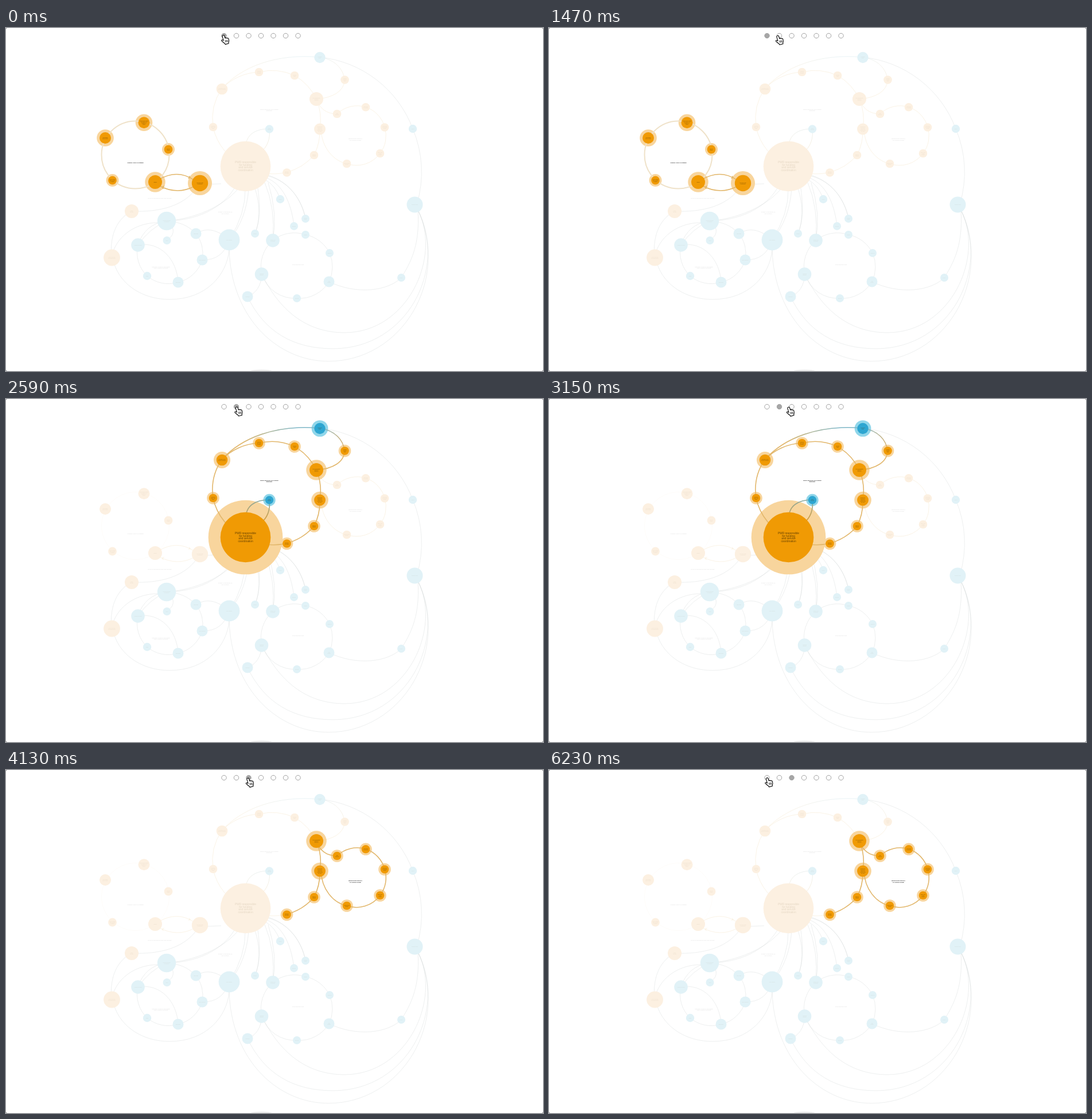
Write an HTML page that moves like this. It is 936 px wide and 599 px high and loops after 6300 ms.

```html
<!DOCTYPE html>
<html lang="en">
<head>
<meta charset="utf-8">
<title>System map</title>
<style>
html, body { margin: 0; width: 100%; height: 100%; overflow: hidden; background: #555 }
svg { display: block; font-family: "Liberation Sans", Arial, sans-serif; text-anchor: middle }
.halo { display: none }
.halo.on { display: inline }
.orange .halo { fill: #f8d59d }
.blue .halo { fill: #90d6ea }
.orange .core { fill: #fcf0e1 }
.blue .core { fill: #e1f2f7 }
.orange .core.on { fill: #f09a04 }
.blue .core.on { fill: #2ea6d1 }
.edge { fill: none; stroke: #e2b76c; stroke-width: 1; opacity: .17 }
.edge.on { stroke-width: 1.6; opacity: 1 }
.ring { opacity: .04 }
.ring.on { stroke: #efe2c9; stroke-width: 2 }
.base { stroke: #cdd3d3; opacity: .36 }
.tag { font-size: 1.8px; fill: #4a3000; opacity: .13 }
.tag.on { opacity: .85 }
.title { font-size: 2.5px; font-weight: bold; fill: #000; opacity: .13 }
.title.on { opacity: 1 }
.big { font-size: 4.8px }
.dot { fill: #fff; stroke: #a2a2a2 }
.dot.on { fill: #a6a6a6 }
</style>
</head>
<body>
<svg id="stage" width="936" height="599" viewBox="0 0 936 599">
  <defs>
    <linearGradient id="toBlue" gradientUnits="userSpaceOnUse" x1="376" y1="0" x2="547" y2="0">
      <stop offset=".2" stop-color="#e2b76c"/><stop offset=".75" stop-color="#7db6c6"/>
    </linearGradient>
    <linearGradient id="fromBlue" gradientUnits="userSpaceOnUse" x1="555" y1="0" x2="590" y2="0">
      <stop offset="0" stop-color="#86b3bb"/><stop offset="1" stop-color="#d8b271"/>
    </linearGradient>
    <linearGradient id="down" gradientUnits="userSpaceOnUse" x1="0" y1="176" x2="0" y2="212">
      <stop offset="0" stop-color="#88aaa5"/><stop offset="1" stop-color="#d59d3c"/>
    </linearGradient>
  </defs>
  <rect width="936" height="599" rx="2" fill="#fff"/>
  <ellipse cx="445" cy="599" rx="18" ry="2.5" fill="#ededed"/>
  <g id="under"></g><g id="halos"></g><g id="edges"></g><g id="cores"></g><g id="texts"></g><g id="dots"></g>
  <g id="hand" stroke="#000" stroke-width="1.1" stroke-linejoin="round" stroke-linecap="round">
    <path fill="#fff" d="M-.2-.5c1-.4 1.9 0 2.2 1l1.2 4c.3-.8 1.6-.9 2 0c.5-.7 1.6-.6 2 .2c.6-.6 1.8-.3 2 .7l.6 3c.3 1.5-.2 2.5-.6 3.5l.2 1.8-6 1.6-.8-1.6c-2-1.2-3.5-2.8-5.4-4.4c-1-1 .3-2.2 1.6-1.6l1.6.9-2-7c-.3-1 .2-1.8 1.4-2.1z"/>
    <path fill="none" stroke-width=".8" d="M3.4 8.3l.7 3M5.3 8l.7 3M7.2 7.8l.6 3"/>
  </g>
  <path id="arrow" stroke="#fff" stroke-width=".8" d="M0 0V12.5L2.9 9.9L5 14.6L7 13.7L5 9.2H9z"/>
</svg>
<script>
const LOOP = 6300, STEP = 70;
const $ = id => document.getElementById(id);
const lit = [];   // elements that light up, with the scenes they belong to

function add(parent, tag, attrs, scenes = "", text = "") {
  const el = document.createElementNS("http://www.w3.org/2000/svg", tag);
  for (const k in attrs) el.setAttribute(k, attrs[k]);
  el.textContent = text;
  parent.append(el);
  if (scenes) lit.push([el, scenes]);
  return el;
}

function write(x, y, text, cls, scenes, gap) {
  const lines = text.split("|");
  lines.forEach((line, i) => add($("texts"), "text",
    { x, y: y + (i - (lines.length - 1) / 2) * gap + gap * .3, class: cls }, scenes, line));
}

function nodes(color, scenes, list) {
  const halos = add($("halos"), "g", { class: color });
  const cores = add($("cores"), "g", { class: color });
  for (const [cx, cy, r, label] of list) {
    add(halos, "circle", { cx, cy, r: r * 1.48, class: "halo" }, scenes);
    add(cores, "circle", { cx, cy, r, class: "core" }, scenes);
    const big = r > 40;
    write(cx, cy, label, big ? "tag big" : "tag", scenes, big ? 4.8 : 2.1);
  }
}

function edges(scenes, paths, cls = "", stroke) {
  for (const d of paths) {
    const el = add($(scenes ? "edges" : "under"), "path", { d, class: "edge " + cls }, scenes);
    if (stroke) el.style.stroke = `url(#${stroke})`;
  }
}

nodes("orange", "1", [
  [240.5, 165.3, 10, "People with needs|are seen as a|burden on|others"], [173, 192, 10, "Withdrawal|from society"],
  [283, 212, 7.4, "Fear of|others"], [185.5, 266, 7.4, "Less contact|with people|in public"],
  [260, 269, 12, "Stigma"], [338, 271, 14.2, "Perceived low|contribution"]]);
nodes("orange", "2", [
  [417.5, 241.5, 43.8, "PWD responsible|for funding|and service|coordination"],
  [441, 77, 7.3, "Services|are hard|to reach"], [503, 83, 7.3, "Unclear|roles"], [590.5, 90.5, 7.3, "Limited|shared|data"],
  [376.5, 106.5, 9.8, "Funding is split|across programs"], [361, 173, 7.3, "Complex|rules and|forms"]]);
nodes("blue", "2", [[547, 51.5, 9.7, "Common|goals"], [459, 176.5, 7.2, "Direct|funding"]]);
nodes("orange", "23", [
  [541, 124, 12, "Low coordination|between|services"], [547, 176.5, 10, "Needs are|not met in|time and|people wait|for care"],
  [537, 222, 7.3, "Gaps in|support"], [489.5, 252.5, 7.3, "Burden|on family"]]);
nodes("orange", "3", [
  [577, 150, 7.3, "Staff|turnover"], [627, 138.3, 7.3, "Low trust|in services"], [660, 173.5, 7.3, "Poor flow|of needed|details"],
  [652, 219, 7.3, "More cost|to the|system"], [594, 237, 7.3, "Rules grow|stricter"]]);
nodes("orange", "", [[219, 320, 12, "Lower|income"], [184.5, 401, 14.4, "Lack of access|to employment"]]);
nodes("blue", "", [
  [280, 337, 16.2, "Inclusive design|of services"], [230, 379, 11.8, "Shared planning"], [280.5, 371, 7, "Trust"],
  [331, 359, 9.5, "New skills"], [389, 370, 18.4, "Peer support"], [342, 405, 9.5, "Open dialogue"],
  [246, 433, 7.2, "Pride"], [300, 444, 9.5, "Belonging"], [434, 359, 7, "Choice"]]);
nodes("blue", "", [
  [465, 371, 11.8, "Single point|of contact"], [478, 299, 7.2, "Advice"], [522, 333, 7, "Simple|forms"],
  [502, 346, 7, "Mentors"], [522, 361, 7, "Guides"], [564, 393, 7, "Records"], [563, 443, 9.5, "Joint|budget"],
  [507, 472, 7, "Review"], [445.5, 430, 11.8, "Learning|network"], [421, 469, 9.5, "Outreach"],
  [689, 436, 7, "Policy"], [712.5, 308.5, 14, "Shared vision"], [709, 176, 7.2, "Values"]]);

edges("1", ["M284.5 221.5A59 59 0 1 1 166.5 221.5A59 59 0 1 1 284.5 221.5"], "ring");
edges("1", ["M266 265Q298 246 327 265", "M327 277Q298 292 266 275",
  "M317.5 262.5L321 261.5 319.5 258.5", "M276 276L272.5 277.5 274 281"]);
edges("2", [
  "M417 241A95 95 0 0 1 361 173A95 95 0 0 1 376 106A95 95 0 0 1 441 77A95 95 0 0 1 503 83A95 95 0 0 1 541 124",
  "M489 252A95 95 0 0 1 417 241", "M590 90C590 110 570 122 541 124"]);
edges("2", ["M376 106C410 68 470 44 547 51"], "", "toBlue");
edges("2", ["M547 51C574 55 588 72 590 90"], "", "fromBlue");
edges("2", ["M459 176C435 176 417 186 418 210", "M459 176C461 193 456 207 444 217"], "", "down");
edges("23", ["M541 124A95 95 0 0 1 547 176A95 95 0 0 1 537 222A95 95 0 0 1 489 252"]);
edges("3", [
  "M541 124Q550 150 577 150A51 51 0 0 1 627 138A51 51 0 0 1 660 173A51 51 0 0 1 652 219A51 51 0 0 1 594 237",
  "M594 237C570 232 550 208 549 176"]);
edges("", [
  "M547 51A194 194 0 0 1 709 176A194 194 0 0 1 716 308",
  "M718 318C722 380 705 410 689 436C665 460 610 466 563 443",
  "M718 318C760 400 700 532 590 532C530 532 480 500 446 430",
  "M718 318C770 420 700 560 570 560C500 560 450 530 421 469",
  "M718 318C775 440 690 582 562 582C470 582 385 500 389 370",
  "M188 410C200 450 240 474 285 474C350 474 385 430 389 388",
  "M264 340C225 340 190 365 184 401", "M219 320C195 332 180 360 184 401", "M219 320C270 322 310 310 332 280",
  "M352 273L375 272"], "base");
edges("", [
  "M280 337C340 332 385 305 405 280", "M280 337C345 336 385 305 400 276",
  "M280 337Q242 342 230 379", "M280 337Q250 350 230 379", "M285 340Q300 358 280 371",
  "M230 379C270 372 298 405 300 444", "M230 379A57 57 0 0 0 246 433A57 57 0 0 0 300 444A57 57 0 0 0 342 405A57 57 0 0 0 331 359A70 70 0 0 0 280 337",
  "M389 370Q358 342 331 359", "M389 370Q378 406 342 405"], "base");
edges("", [
  "M417 280Q418 325 389 370", "M423 280Q419 335 389 370", "M434 280Q448 325 434 359", "M439 280Q446 330 434 359",
  "M451 270Q470 315 465 371", "M457 270Q474 325 465 371", "M452 265Q470 275 478 299",
  "M455 262C485 275 498 310 502 346", "M455 258C495 268 515 300 522 333", "M452 256C490 264 517 300 522 333",
  "M465 371A60 60 0 0 1 522 361A60 60 0 0 1 564 393A60 60 0 0 1 563 443A60 60 0 0 1 507 472A60 60 0 0 1 446 430A60 60 0 0 1 465 371",
  "M446 430Q444 460 421 469"], "base");

write(225.5, 234.8, "Vicious Cycle of Stigma", "title", "1", 2.7);
write(459, 143.3, "Deep Structure for System|Behavior", "title", "2", 2.7);
write(609, 195, "Reinforcing barriers|to System Health", "title", "3", 2.7);
write(268, 297.5, "Cycle of exclusion and low income", "title", "", 2.7);
write(382, 323, "Points of leverage in|the system", "title", "", 2.7);
write(270, 418.3, "Virtuous cycle of inclusion|and a sense of worth", "title", "", 2.7);
write(509, 413.5, "Coordinated care", "title", "", 2.7);

const dotX = i => 380 + 21.5 * i;
const dots = Array.from({ length: 7 }, (_, i) => add($("dots"), "circle", { cx: dotX(i), cy: 13.5, r: 4.2, class: "dot" }));

// pointer tip: time, x, y
const path = [[0, 378.7, 13.3], [490, 378.7, 13.3], [980, 392, 13], [1190, 396, 13.5], [1750, 401, 14.5], [1890, 400, 14.5],
  [2520, 400, 14.5], [3150, 417.5, 14.8], [3920, 421.5, 14.8], [4550, 421.5, 14.8], [5250, 386, 14.8],
  [5530, 381, 14.5], [5810, 380, 14.3], [6300, 380, 14.3]];

function pointerAt(t) {
  const i = path.findIndex(p => p[0] > t);
  const [t0, x0, y0] = path[i - 1], [t1, x1, y1] = path[i];
  const k = (t - t0) / (t1 - t0);
  return [x0 + (x1 - x0) * k, y0 + (y1 - y0) * k];
}

function draw(now) {
  const t = Math.floor(now % LOOP / STEP) * STEP;
  const scene = t < 2170 ? "1" : t < 4130 ? "2" : "3";
  const chosen = t < 2100 ? 0 : t < 4060 ? 1 : 2;
  for (const [el, scenes] of lit) el.classList.toggle("on", scenes.includes(scene));
  dots.forEach((d, i) => d.classList.toggle("on", i === chosen));
  const [x, y] = pointerAt(t);
  const over = dots.some((_, i) => Math.abs(dotX(i) - x) < 8);
  for (const id of ["hand", "arrow"]) {
    $(id).setAttribute("transform", `translate(${x} ${y})`);
    $(id).style.display = (id === "hand") === over ? "" : "none";
  }
  requestAnimationFrame(() => draw(performance.now() - start));
}
const start = performance.now();
draw(0);
</script>
</body>
</html>
```
